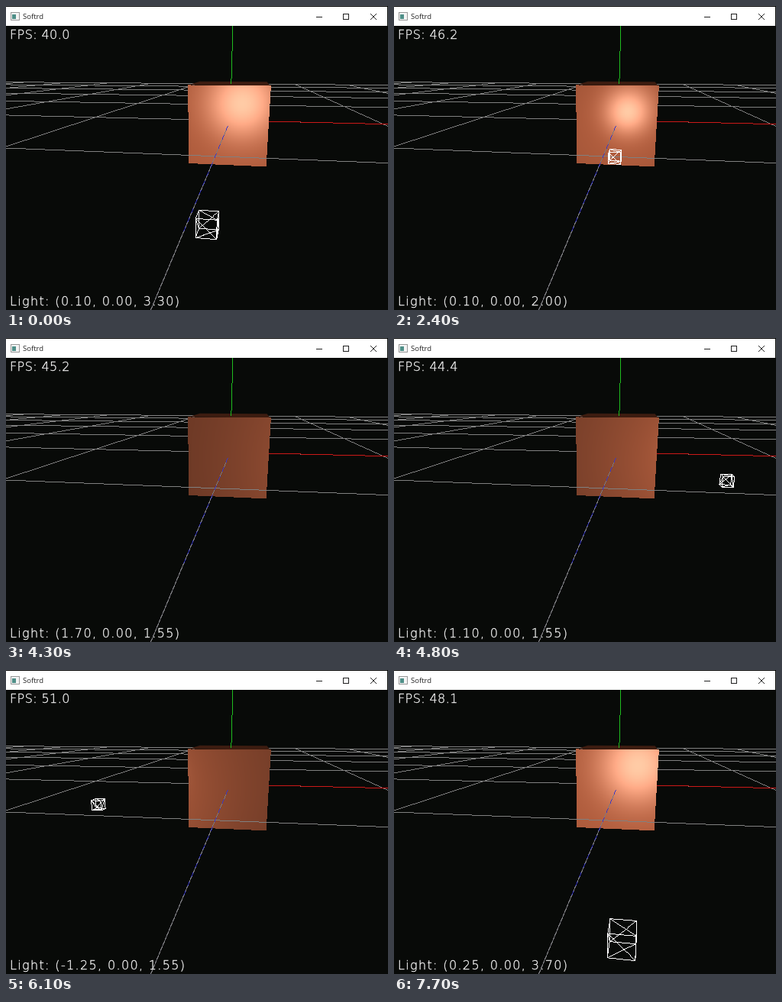
Write an HTML page with a canvas that moves like this. It is 500x398 px and loops after 7800 ms.

```html
<!DOCTYPE html>
<html lang="en">
<head>
<meta charset="utf-8">
<title>Softrd</title>
<style>
  html, body { margin: 0; width: 100%; height: 100%; overflow: hidden; background: #080a08; }
  #stage { position: relative; width: 500px; height: 398px; overflow: hidden; }
  canvas { position: absolute; left: 0; top: 0; }
  #bar { position: absolute; left: 0; top: 0; width: 499px; height: 25px; border-top: 1px solid #000; background: #fff; }
  #bar span { position: absolute; left: 22px; top: 6px; font: 9.5px/14px "Open Sans", "Noto Sans", sans-serif; color: #222; }
  #bar svg { position: absolute; left: 0; top: -1px; }
  .hud { position: absolute; left: 5px; white-space: pre; color: #fff; font: 200 16px/20px "DejaVu Sans", sans-serif; -webkit-text-stroke: .3px #fff; }
  #fps { top: 28px; letter-spacing: .4px; }
  #light { top: 377px; letter-spacing: 1.35px; }
</style>
</head>
<body>
<div id="stage">
  <canvas id="view" width="500" height="398"></canvas>
  <div id="fps" class="hud"></div>
  <div id="light" class="hud"></div>
  <div id="bar">
    <span>Softrd</span>
    <svg width="499" height="26" fill="none" stroke="#222" shape-rendering="crispEdges">
      <rect x="6.5" y="8.5" width="11" height="10" fill="#f4f4f4" stroke="#999"/>
      <rect x="8" y="11" width="5" height="6" fill="#4f8f88" stroke="none"/>
      <path d="M406 14.5h8M441.5 10.5h7v7h-7z"/>
      <path d="M477 10l8 8m0-8l-8 8" shape-rendering="auto"/>
    </svg>
  </div>
</div>
<script>
const LOOP = 7800, W = 500, H = 398;
const ctx = document.getElementById('view').getContext('2d', { willReadFrequently: true });
const fpsText = document.getElementById('fps');
const lightText = document.getElementById('light');

// Camera basis, position and projection
const RIGHT = [.988, 0, -.155], UP = [-.0438, .9585, -.281], FWD = [-.1476, -.2845, -.947];
const EYE = [.28, .738, 4.8], OFFSET = [.463, .655, 4.8];
const CX = 249.7, CY = 210.6, FOCAL = 449, NEAR = .1;

const dot = (a, b) => a[0] * b[0] + a[1] * b[1] + a[2] * b[2];
const unit = v => { const n = Math.hypot(...v); return v.map(c => c / n); };
const toCam = p => [RIGHT, UP, FWD].map((axis, k) => dot(p, axis) + OFFSET[k]);
const toScreen = c => [CX + FOCAL * c[0] / c[2], CY - FOCAL * c[1] / c[2]];

// One-pixel line without smoothing; dash = [period, on]
function line(p, q, color, dash) {
  let a = toCam(p), b = toCam(q);
  if (a[2] < NEAR && b[2] < NEAR) return;
  const cut = (from, to) => {
    const k = (NEAR - from[2]) / (to[2] - from[2]);
    return from.map((c, i) => c + (to[i] - c) * k);
  };
  if (a[2] < NEAR) a = cut(a, b);
  else if (b[2] < NEAR) b = cut(b, a);
  const [x0, y0] = toScreen(a), [x1, y1] = toScreen(b);
  const n = Math.ceil(Math.max(Math.abs(x1 - x0), Math.abs(y1 - y0), 1));
  ctx.fillStyle = color;
  for (let i = 0; i <= n; i++) {
    if (dash && i % dash[0] >= dash[1]) continue;
    const x = Math.round(x0 + (x1 - x0) * i / n), y = Math.round(y0 + (y1 - y0) * i / n);
    if (x >= 0 && x < W && y >= 26 && y < H) ctx.fillRect(x, y, 1, 1);
  }
}

const GRID = '#808080';
function drawBackground() {
  ctx.fillStyle = '#080a08';
  ctx.fillRect(0, 0, W, H);
  for (let z = -10; z <= 2; z += 2) line([-12, 0, z], [12, 0, z], GRID);
  for (let x = -12; x <= 12; x += 2) line([x, 0, -10], [x, 0, 10], GRID);
  line([0, 0, 0], [4, 0, 0], '#cc1818');
  // Unlit top of the cube
  ctx.fillStyle = '#3c1c10';
  ctx.beginPath();
  for (const [x, z] of [[-.5, .5], [-.5, -.5], [.5, -.5], [.5, .5]]) {
    ctx.lineTo(...toScreen(toCam([x, .5, z])));
  }
  ctx.fill();
  line([0, .5, 0], [0, 1.5, 0], '#20bc20');
}

// Diffuse and specular light on the front face, pixel by pixel
const FACE = { x: 234, y: 99, w: 118, h: 115 };
function drawFace(light) {
  const img = ctx.getImageData(FACE.x, FACE.y, FACE.w, FACE.h);
  for (let j = 0; j < FACE.h; j++) for (let i = 0; i < FACE.w; i++) {
    const dx = (FACE.x + i - CX) / FOCAL, dy = (CY - FACE.y - j) / FOCAL;
    const ray = FWD.map((f, k) => f + RIGHT[k] * dx + UP[k] * dy);
    const t = (.5 - EYE[2]) / ray[2];
    const x = EYE[0] + ray[0] * t, y = EYE[1] + ray[1] * t;
    if (Math.max(Math.abs(x), Math.abs(y)) > .505) continue;
    const l = unit([light[0] - x, light[1] - y, light[2] - .5]);
    const mirror = [-l[0], -l[1], l[2]];
    const shine = Math.max(0, dot(mirror, unit(ray.map(c => -c))));
    const base = 60 + 118 * Math.max(0, l[2]);
    const spec = l[2] > 0 ? 110 * shine ** 32 : 0;
    const o = 4 * (j * FACE.w + i);
    img.data[o] = base + spec;
    img.data[o + 1] = base * .525 + spec;
    img.data[o + 2] = base * .345 + spec * .95;
  }
  ctx.putImageData(img, FACE.x, FACE.y);
}

function drawFront() {
  line([-12, 0, 2], [12, 0, 2], GRID);
  line([0, 0, .5], [0, 0, 6], '#7a7a80');
  line([0, 0, .5], [0, 0, 3.4], '#3a3ac4', [12, 6]);
}

// Wire cube around the light: edges plus one diagonal per face
function drawLamp(light) {
  if (toCam(light)[2] < .2) return;
  const corner = n => light.map((c, k) => c + (n >> k & 1 ? .05 : -.05));
  const bits = n => (n & 1) + (n >> 1 & 1) + (n >> 2);
  for (let a = 0; a < 8; a++) for (let b = a + 1; b < 8; b++) {
    const d = a ^ b, odd = bits(a) % 2 === 1;
    const diagonal = bits(d) === 2 && odd === (d === 5);
    if (bits(d) === 1 || diagonal) line(corner(a), corner(b), '#fff');
  }
}

// The light travels in straight stretches and snaps to steps of .05
function lightAt(t) {
  const move = (from, to, by) => by * Math.min(1, Math.max(0, (t - from) / (to - from)));
  const snap = v => Math.round(v * 20 + 1e-6) / 20;
  const x = .1 + move(3400, 4150, 1.6) + move(4450, 5900, -3.6) + move(5900, 6550, 2.15);
  const z = 3.3 + move(0, 600, 1.1) + move(1170, 2862, -3.3) + move(2900, 3150, .45) + move(6550, 7700, 2.15);
  return [snap(x), 0, snap(z)];
}

function rateAt(t) {
  const r = Math.sin(t * 12.9898) * 43758.5453;
  return 40 + 13 * (r - Math.floor(r));
}

// The picture is redrawn at an even pace, on whole tenths of a second
const LAST = 7700, REDRAWS = 53;
function redrawTime(t) {
  const at = k => Math.floor(k * LAST / REDRAWS / 100) * 100;
  let k = Math.min(REDRAWS, Math.floor((t + 100) * REDRAWS / LAST));
  while (at(k) > t) k--;
  return at(k);
}

drawBackground();
const backdrop = ctx.getImageData(0, 0, W, H);

function draw(t) {
  const light = lightAt(t);
  ctx.putImageData(backdrop, 0, 0);
  drawFace(light);
  drawFront();
  drawLamp(light);
  fpsText.textContent = 'FPS: ' + rateAt(t).toFixed(1);
  lightText.textContent = `Light: (${light.map(c => c.toFixed(2)).join(', ')})`;
}

const start = performance.now();
let shown = -1;
function tick() {
  const now = redrawTime((performance.now() - start) % LOOP);
  if (now !== shown) draw(shown = now);
  requestAnimationFrame(tick);
}
tick();
</script>
</body>
</html>
```
